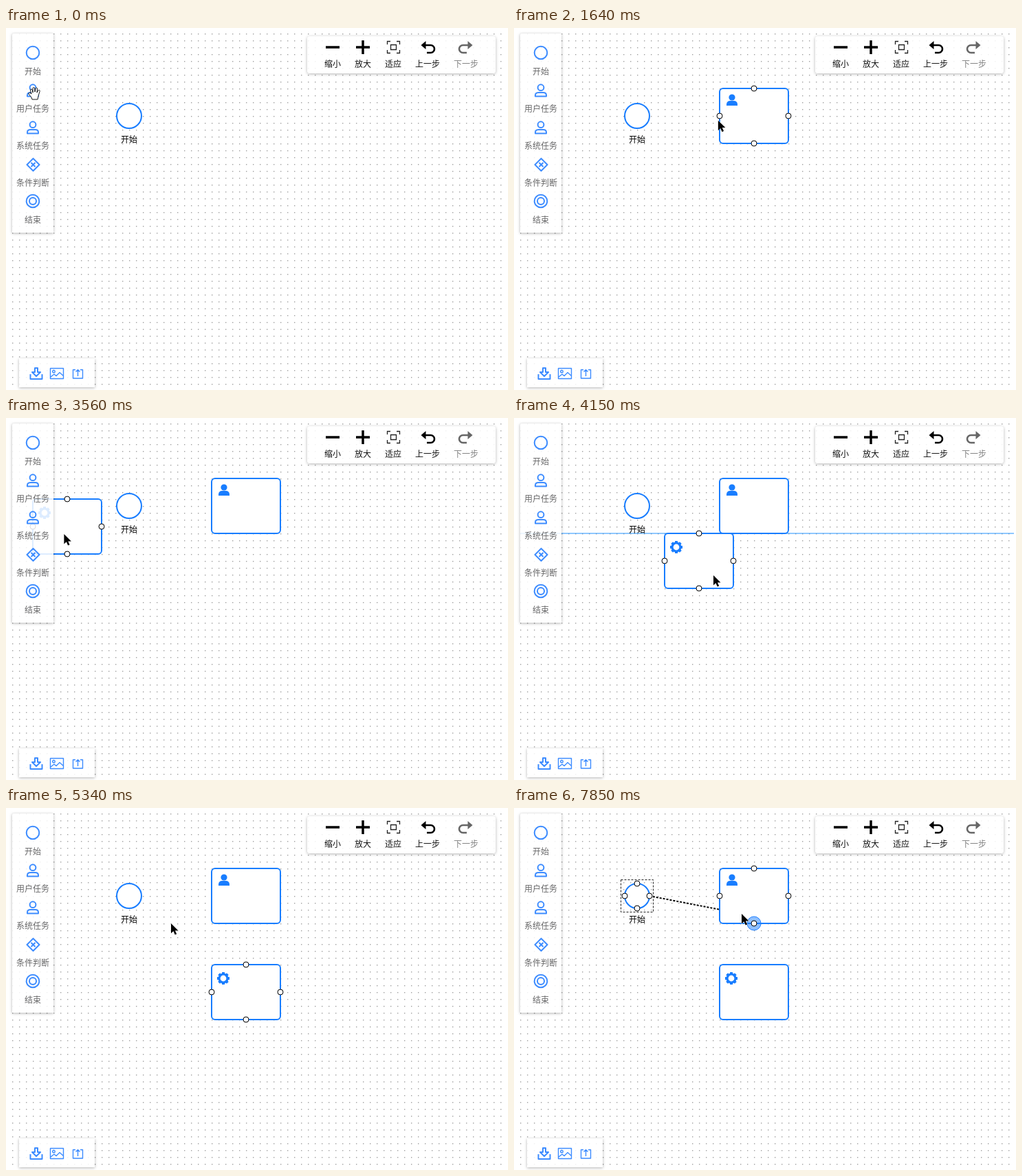
An HTML page for the animation above (8 s loop, 730 px wide and 527 px high).

```html
<!DOCTYPE html>
<html lang="zh">
<head>
<meta charset="utf-8">
<title>流程图编辑器</title>
<style>
  html, body { margin: 0; width: 100%; height: 100%; overflow: hidden; background: #fff; }
  svg { position: absolute; left: 0; top: 0; }
  .panel { position: absolute; background: rgba(255, 255, 255, .85); box-shadow: 0 1px 4px rgba(0, 0, 0, .3); }
  #palette { left: 9px; top: 8px; width: 60px; height: 290px; }
  #toolbar { left: 438px; top: 12px; width: 274px; height: 54px; border-radius: 4px; }
  #exports { left: 19px; top: 481px; width: 110px; height: 42px; }
  text { font: 12px "Noto Sans CJK SC", "Noto Sans CJK", sans-serif; text-anchor: middle; }
  .shape { fill: #fff; stroke: #187dff; stroke-width: 2; }
  .solid { fill: #187dff; }
  .anchor { fill: #fff; stroke: #000; }
  .halo { fill: #1e80ff; fill-opacity: .5; stroke: #1e80ff; }
  .guide { stroke: #1e90ff; stroke-width: 1; }
  .icons { fill: none; stroke: #3d8cff; stroke-width: 2; stroke-linejoin: round; }
  .thin { stroke-width: 1.4; }
  .palette-text { fill: #676768; }
</style>
</head>
<body>
<svg width="730" height="527">
  <defs>
    <pattern id="dots" x="9" y="8" width="10" height="10" patternUnits="userSpaceOnUse">
      <rect width="1.4" height="1.4" fill="#a0a0a0"/>
    </pattern>
  </defs>
  <rect x="9" y="8" width="718" height="519" fill="url(#dots)"/>
  <line id="guideX" class="guide" y1="8" y2="527"/>
  <line id="guideY" class="guide" x1="9" x2="727"/>
  <line id="link" x1="197" y1="128" stroke="#000" stroke-width="2" stroke-dasharray="3 2"/>
  <g transform="translate(179 128)">
    <circle class="shape" r="18"/>
    <text y="39">开始</text>
    <rect id="selection" x="-23.5" y="-23.5" width="47" height="47" fill="none" stroke="#222" stroke-dasharray="3 2"/>
    <g id="startAnchors"></g>
  </g>
  <g id="user">
    <rect class="shape" x="-50" y="-40" width="100" height="80" rx="5"/>
    <circle class="solid" cx="-32" cy="-27" r="4.6"/>
    <path class="solid" d="M-40-15v-1.5q0-5.5 5.5-5.5h5q5.5 0 5.5 5.5v1.5z"/>
    <g id="userAnchors"></g>
  </g>
  <g id="system">
    <rect class="shape" x="-50" y="-40" width="100" height="80" rx="5"/>
    <g id="gear" transform="translate(-33 -20)" fill="none" stroke="#187dff">
      <circle r="6" stroke-width="3.2"/>
    </g>
    <g id="systemAnchors"></g>
  </g>
</svg>

<div id="palette" class="panel"></div>
<div id="toolbar" class="panel"></div>
<div id="exports" class="panel"></div>

<svg width="730" height="527">
  <defs>
    <g id="person">
      <circle cy="-4.3" r="4.4"/>
      <path d="M-8 8.5V7q0-4 4.500-4h7q4.500 0 4.500 4v1.500z"/>
    </g>
    <g id="undo">
      <path d="M-5-3H3.500a5.500 5.500 0 0 1 0 11H-2" fill="none" stroke="currentColor" stroke-width="2.6"/>
      <path d="M-10.500-3l7-6v12z" fill="currentColor"/>
    </g>
  </defs>
  <g class="icons">
    <circle cx="39" cy="36" r="9.3"/>
    <use href="#person" x="39" y="91"/>
    <use href="#person" x="39" y="145"/>
    <path d="M39.500 190l9 9-9 9-9-9zM36.500 196l6 6m0-6l-6 6"/>
    <circle cx="39" cy="252" r="9.3"/>
    <circle cx="39" cy="252" r="5"/>
    <path d="M42 495v6h-4l6 6 6-6h-4v-6zM35.500 504v7h17v-7"/>
    <path class="thin" d="M64.500 495.500h19v15h-19zM65 508l5-4 3 2.500 5-5 5.500 5"/>
    <circle class="thin" cx="69.500" cy="500" r="1.800"/>
    <path class="thin" d="M101 497.500h-3.500v12.500h14v-12.500H108M104.500 507v-9M101.500 500.500l3-3 3 3"/>
  </g>
  <path d="M465 28h20M509 28h20M519 18v20" stroke="#000" stroke-width="3.5"/>
  <path d="M554.500 24v-4.500h4.500M568 19.500h4.500V24M572.500 32v4.500H568M559 36.500h-4.500V32M559.500 24.500h8v7h-8z"
        fill="none" stroke="#222" stroke-width="1.3"/>
  <use href="#undo" x="614" y="28"/>
  <use href="#undo" transform="translate(668 28) scale(-1 1)" color="#666"/>
  <g id="labels"></g>
  <path id="arrow" d="M0 0v14.500l3.400-3.200 2.300 5.200 2.500-1.100-2.300-5h4.600z" stroke="#fff" paint-order="stroke"/>
  <g id="hand" fill="#fff" stroke="#000" stroke-width=".9" stroke-linejoin="round">
    <path d="M-3 9L-4 6-8 1Q-8-1-6.500-1L-4 1-5.500-4Q-5.500-6-4-6-3-6-2.500-4L-2-1V-7Q-2-8.500-.700-8.500.700-8.500.700-7L1-2 2-6.500Q2.500-8 3.500-8 5-7.500 4.500-6L4-1 5.500-4Q6.500-5 7.500-4.500 8.500-4 8-2.500L6 4 5 9z"/>
  </g>
</svg>

<script>
const LOOP = 8000;
const TICK = 148.1; // the picture is refreshed once per tick
const START = [179, 128];
const $ = id => document.getElementById(id);

function add(parent, tag, attrs, text = '') {
  const el = document.createElementNS('http://www.w3.org/2000/svg', tag);
  for (const name in attrs) el.setAttribute(name, attrs[name]);
  el.textContent = text;
  return parent.appendChild(el);
}

['开始', '用户任务', '系统任务', '条件判断', '结束'].forEach((label, i) =>
  add($('labels'), 'text', { x: 39, y: 67.5 + 54 * i, class: 'palette-text' }, label));
[['缩小', 475], ['放大', 519], ['适应', 563], ['上一步', 613], ['下一步', 669, '#808080']].forEach(
  ([label, x, fill = '#111']) => add($('labels'), 'text', { x, y: 56.5, fill }, label));

for (let i = 0; i < 8; i++)
  add($('gear'), 'path', { d: 'M0-6.5V-9', 'stroke-width': 4, transform: `rotate(${45 * i})` });

const anchorPoints = (rx, ry) => [[0, -ry], [rx, 0], [0, ry], [-rx, 0]];
for (const [id, rx, ry] of [['startAnchors', 18, 18], ['userAnchors', 50, 40], ['systemAnchors', 50, 40]]) {
  add($(id), 'circle', { r: 10, class: 'halo' });
  for (const [cx, cy] of anchorPoints(rx, ry)) add($(id), 'circle', { cx, cy, r: 4, class: 'anchor' });
}

// Moves are [first tick, last tick, x, y]; each one departs from where the last one ended.
const cursorMoves = [
  [0, 1, 38, 97],
  [2, 5, 266, 119], [5, 7, 346, 129],
  [10, 16, 51, 163], [16, 18, 42, 200], [18, 22, 33, 154],
  [23, 28, 290, 229], [28, 33, 349, 268],
  [35, 36, 240, 168], [36, 38, 186, 132], [38, 42, 197, 128],
  [43, 44, 252, 126], [44, 49, 303, 128], [51, 53, 331, 154],
];
const userMoves = [[2, 5, 229, 118], [5, 7, 349, 128]];
const systemMoves = [[23, 28, 269, 208], [28, 31.5, 349, 268]];
const linkMoves = [[43, 44, 238, 128], [44, 49, 299, 128], [51, 53, 331, 154]];

function follow([x, y], moves, tick) {
  for (const [from, to, toX, toY] of moves) {
    const p = Math.min(1, Math.max(0, (tick - from) / (to - from)));
    x += (toX - x) * p;
    y += (toY - y) * p;
  }
  return [x, y];
}

const snap = ([x, y]) => [Math.round((x - 9) / 10) * 10 + 9, Math.round((y - 8) / 10) * 10 + 8];
const distance = (a, b) => Math.hypot(a[0] - b[0], a[1] - b[1]);
const show = (el, on) => el.setAttribute('visibility', on ? 'inherit' : 'hidden');

function place(el, [x, y], on) {
  show(el, on);
  el.setAttribute('transform', `translate(${x} ${y})`);
}

function stretch(el, ends, on) {
  show(el, on);
  if (on) for (const name in ends) el.setAttribute(name, ends[name]);
}

// Where the dragged box lines up with another node: by centre, else by edge.
function alignment(dragged, start, other, half) {
  if (dragged === start || dragged === other) return dragged;
  return [dragged - half, dragged + half].find(edge => Math.abs(edge - other) === half);
}

function draw(ms) {
  const tick = Math.floor(ms / TICK);
  const within = (from, to = Infinity) => tick >= from && tick < to;

  const cursor = follow([41, 95], cursorMoves, tick);
  const grabbing = within(0, 3) || within(16, 24);
  place($('hand'), cursor, grabbing);
  place($('arrow'), cursor, !grabbing);

  const user = snap(follow([39, 91], userMoves, tick));
  const system = snap(follow([39, 145], systemMoves, tick));
  place($('user'), user, within(3));
  place($('system'), system, within(24));

  const linking = within(44);
  const end = follow([197, 128], linkMoves, tick);
  stretch($('link'), { x2: end[0], y2: end[1] }, linking);
  show($('selection'), linking);

  const linkOverUser = linking && end[0] >= user[0] - 50;
  show($('userAnchors'), within(3, 12) || linkOverUser);
  show($('systemAnchors'), within(24, 37));
  show($('startAnchors'), within(38));

  const onAnchor = !linking && distance(cursor, [197, 128]) < 6;
  place($('startAnchors').firstChild, [18, 0], onAnchor);
  const local = [end[0] - user[0], end[1] - user[1]];
  const nearest = anchorPoints(50, 40).sort((a, b) => distance(a, local) - distance(b, local))[0];
  place($('userAnchors').firstChild, nearest, linkOverUser);
  show($('systemAnchors').firstChild, false);

  const dragged = within(3, 11) ? user : within(24, 36) ? system : null;
  const other = dragged === system ? user : [];
  const gx = dragged && alignment(dragged[0], START[0], other[0], 50);
  const gy = dragged && alignment(dragged[1], START[1], other[1], 40);
  stretch($('guideX'), { x1: gx, x2: gx }, gx);
  stretch($('guideY'), { y1: gy, y2: gy }, gy);
}

const began = performance.now();
function loop() {
  draw((performance.now() - began) % LOOP);
  requestAnimationFrame(loop);
}
loop();
</script>
</body>
</html>
```
